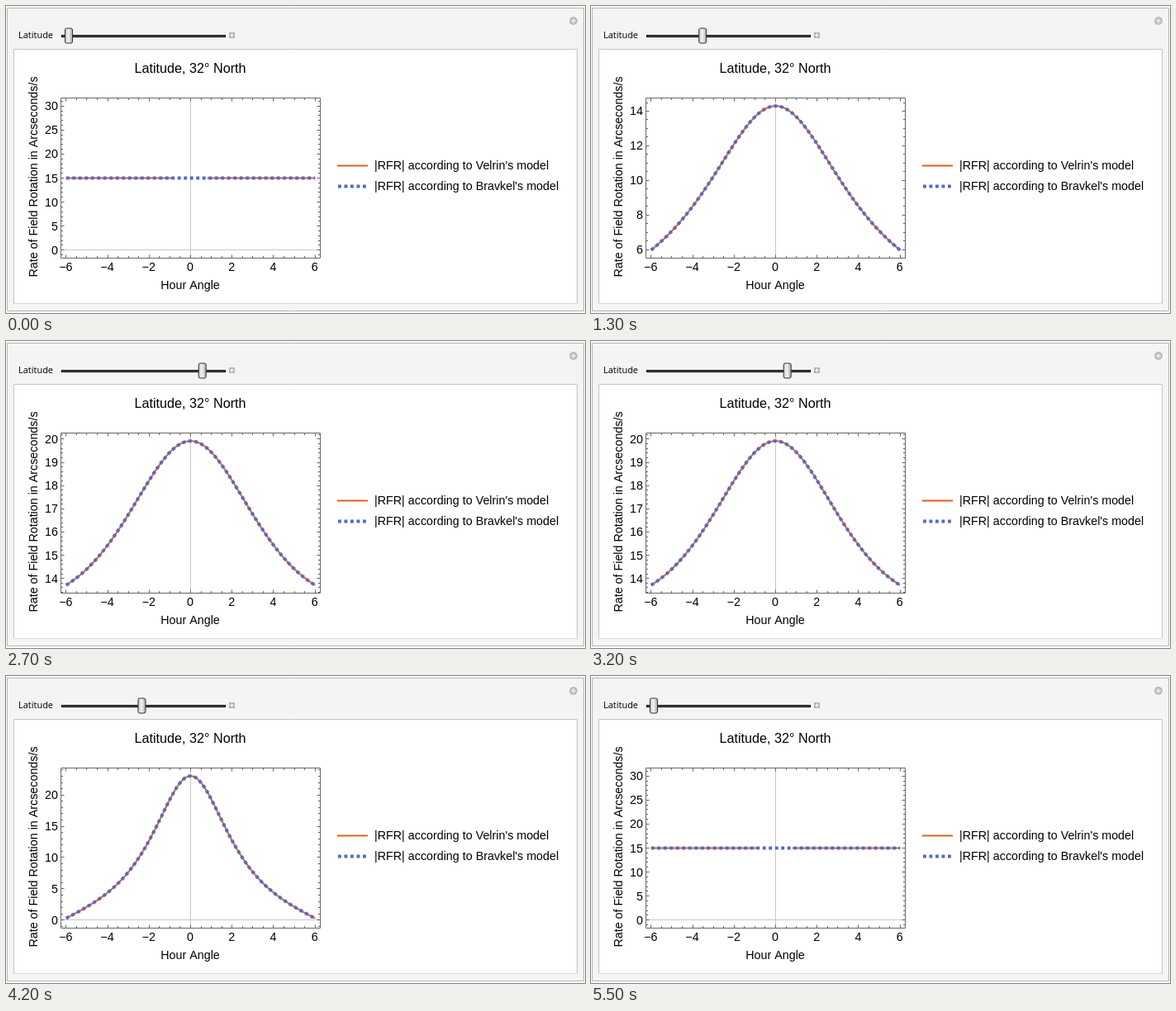
Write an HTML page with a canvas that moves like this. It is 701 by 372 pixels and loops after 6 s.

```html
<!DOCTYPE html>
<html lang="en">
<head>
<meta charset="utf-8">
<style>
  html, body { margin: 0; width: 100%; height: 100%; overflow: hidden; background: #fff; }
  canvas { display: block; }
</style>
</head>
<body>
<canvas id="stage" width="701" height="372"></canvas>
<script>
const g = document.getElementById('stage').getContext('2d');
const RAD = Math.PI / 180;
const LATITUDE = 32 * RAD;
const RED = '#e2611f', BLUE = '#5469cc', LABEL = '14.3px "Liberation Sans", Arial, sans-serif';
const DASH = [3.9, 3.6];
const STEPS = 49, FIRST = -89.4;
const RIGHT = 380.5, MIDDLE = 208.3;
const snap = v => Math.floor(v) + 0.5;

// Field rotation in arcseconds per second for an alt-azimuth mount.
function rotationRate(hour, declination) {
  const d = declination * RAD;
  const sinAlt = Math.sin(LATITUDE) * Math.sin(d) +
    Math.cos(LATITUDE) * Math.cos(d) * Math.cos(hour * 15 * RAD);
  return Math.abs(15 * (Math.sin(d) - Math.sin(LATITUDE) * sinAlt) / (1 - sinAlt * sinAlt));
}

function text(str, x, y, align = 'center', font = LABEL) {
  g.font = font;
  g.textAlign = align;
  g.fillStyle = '#000';
  g.fillText(str, x, y);
}

function line(x1, y1, x2, y2, color, width = 1, dash = []) {
  g.strokeStyle = color;
  g.lineWidth = width;
  g.setLineDash(dash);
  g.beginPath();
  g.moveTo(x1, y1);
  g.lineTo(x2, y2);
  g.stroke();
  g.setLineDash([]);
}

function box(x, y, right, bottom, fill, stroke, radius = 0) {
  g.beginPath();
  g.roundRect(x, y, right - x, bottom - y, radius);
  g.fillStyle = fill;
  g.fill();
  g.strokeStyle = stroke;
  g.lineWidth = 1;
  g.stroke();
}

function plus(x, y, r) {
  line(x - r, y, x + r, y, '#fff');
  line(x, y - r, x, y + r, '#fff');
}

function tickSteps(span) {
  const power = 10 ** Math.floor(Math.log10(span / 7.2));
  const factor = [1, 2, 5, 10].find(f => span / (f * power) <= 7.2);
  return {
    major: factor * power,
    parts: factor === 2 ? 4 : 5,
    decimals: Math.max(0, -Math.floor(Math.log10(factor * power) + 1e-9))
  };
}

function eachTick(lo, hi, { major, parts }, draw) {
  const minor = major / parts;
  for (let i = Math.ceil(lo / minor); i * minor <= hi; i++) draw(i * minor, i % parts === 0);
}

function drawControls(declination, bottom) {
  box(1.5, 2.5, 699.5, bottom + 9, '#f4f4f4', '#b4b4b4');
  box(9.5, 52.5, 691.5, bottom, '#fff', '#c4c4c4');
  line(10, bottom, 691, bottom, '#dcdcdc');
  g.fillStyle = '#bcbcbc';
  g.beginPath();
  g.arc(687, 18, 5, 0, 7);
  g.fill();
  plus(687, 18, 3);
  text('Latitude', 15, 38.5, 'left', '500 11px "Open Sans", sans-serif');
  line(67, 36.5, 266, 36.5, '#000', 3);
  line(68, 36.5, 265, 36.5, '#666');
  g.fillStyle = '#b4b4b4';
  g.fillRect(270, 32, 7, 7);
  plus(273.5, 35.5, 2.5);
  const x = 166 + declination;
  const shade = g.createLinearGradient(x - 4, 0, x + 5, 0);
  shade.addColorStop(0, '#c8c8c8');
  shade.addColorStop(0.4, '#f4f4f4');
  shade.addColorStop(1, '#a0a0a0');
  box(x - 4.5, 27, x + 4.5, 45, shade, '#333', 2);
}

function drawLegend(y) {
  line(401, y + 0.5, 438, y + 0.5, RED, 2);
  text("|RFR| according to Velrin's model", 446, y + 5, 'left');
  line(402, y + 25.5, 438, y + 25.5, BLUE, 4, DASH);
  text("|RFR| according to Bravkel's model", 446, y + 30, 'left');
}

function drawChart(declination) {
  const points = [];
  for (let i = -300; i <= 300; i++) points.push([i / 50, rotationRate(i / 50, declination)]);
  const rates = points.map(p => p[1]);
  let lo = Math.min(...rates), hi = Math.max(...rates);
  const flat = hi - lo < 1e-6;
  if (flat) [lo, hi] = [0, 30];
  if (hi > 100) hi = 26.2;
  if (lo < hi / 20) lo = 0;

  const pad = (hi - lo) / 18;
  const ticks = tickSteps(hi - lo + 2 * pad);
  g.font = LABEL;
  const extra = ticks.decimals ? g.measureText('.' + '0'.repeat(ticks.decimals)).width : 0;
  const left = snap(66.5 + extra), width = RIGHT - left, height = width / 1.618;
  const top = snap(MIDDLE - height / 2), bottom = snap(MIDDLE + height / 2);
  const center = (left + RIGHT) / 2;
  const shrink = Math.round((194.1 - height) / 2);
  const px = hour => center + hour * width / 12.5;
  const py = rate => bottom - (rate - lo + pad) / (hi - lo + 2 * pad) * (bottom - top);

  drawControls(declination, 360.5 - shrink);
  drawLegend(193 - shrink / 2);

  line(snap(center), top, snap(center), bottom, '#c8c8c8');
  if (lo - pad <= 0) line(left, snap(py(0)), RIGHT, snap(py(0)), '#c8c8c8');

  function curve(color, lineWidth, dash, gap) {
    g.strokeStyle = color;
    g.lineWidth = lineWidth;
    g.setLineDash(dash);
    g.beginPath();
    let pen = false;
    for (const [hour, rate] of points) {
      const visible = rate <= hi && Math.abs(hour) >= gap;
      if (visible) g[pen ? 'lineTo' : 'moveTo'](px(hour), py(rate));
      pen = visible;
    }
    g.stroke();
    g.setLineDash([]);
  }
  g.lineJoin = 'round';
  curve(RED, 2, [], flat ? 0.8 : 0);
  curve(BLUE, 4, DASH, 0);

  g.strokeStyle = '#666';
  g.lineWidth = 1;
  g.strokeRect(left, top, width, bottom - top);
  const label = (v, decimals) => v.toFixed(decimals).replace('-', '\u2212');
  eachTick(-6.25, 6.25, { major: 2, parts: 4 }, (v, major) => {
    const x = snap(px(v)), size = major ? 4 : 2.5;
    line(x, bottom, x, bottom - size, '#666');
    line(x, top, x, top + size, '#666');
    if (major) text(label(v, 0), px(v) - 0.5, bottom + 15);
  });
  eachTick(lo - pad, hi + pad, ticks, (v, major) => {
    const y = snap(py(v)), size = major ? 4 : 2.5;
    line(left, y, left + size, y, '#666');
    line(RIGHT, y, RIGHT - size, y, '#666');
    if (major) text(label(v, ticks.decimals), left - 3.5, py(v) + 5, 'right');
  });

  text('Latitude, 32° North', center - 0.5, 81, 'center', '16.2px "Liberation Sans", Arial, sans-serif');
  text('Hour Angle', center - 0.5, bottom + 37);
  g.save();
  g.translate(38, 207);
  g.rotate(-Math.PI / 2);
  text('Rate of Field Rotation in Arcseconds/s', 0, 0);
  g.restore();
}

// The slider rests at -90 degrees, then sweeps up towards 90 and back.
function declinationAt(time) {
  const tick = Math.floor((time - 500) / 100);
  if (tick < 0 || tick > STEPS) return -90;
  return FIRST + Math.min(tick, STEPS - tick) * (90 - FIRST) * 2 / STEPS;
}

function render() {
  g.clearRect(0, 0, 701, 372);
  drawChart(declinationAt(performance.now() % 6000));
  requestAnimationFrame(render);
}
render();
</script>
</body>
</html>
```
